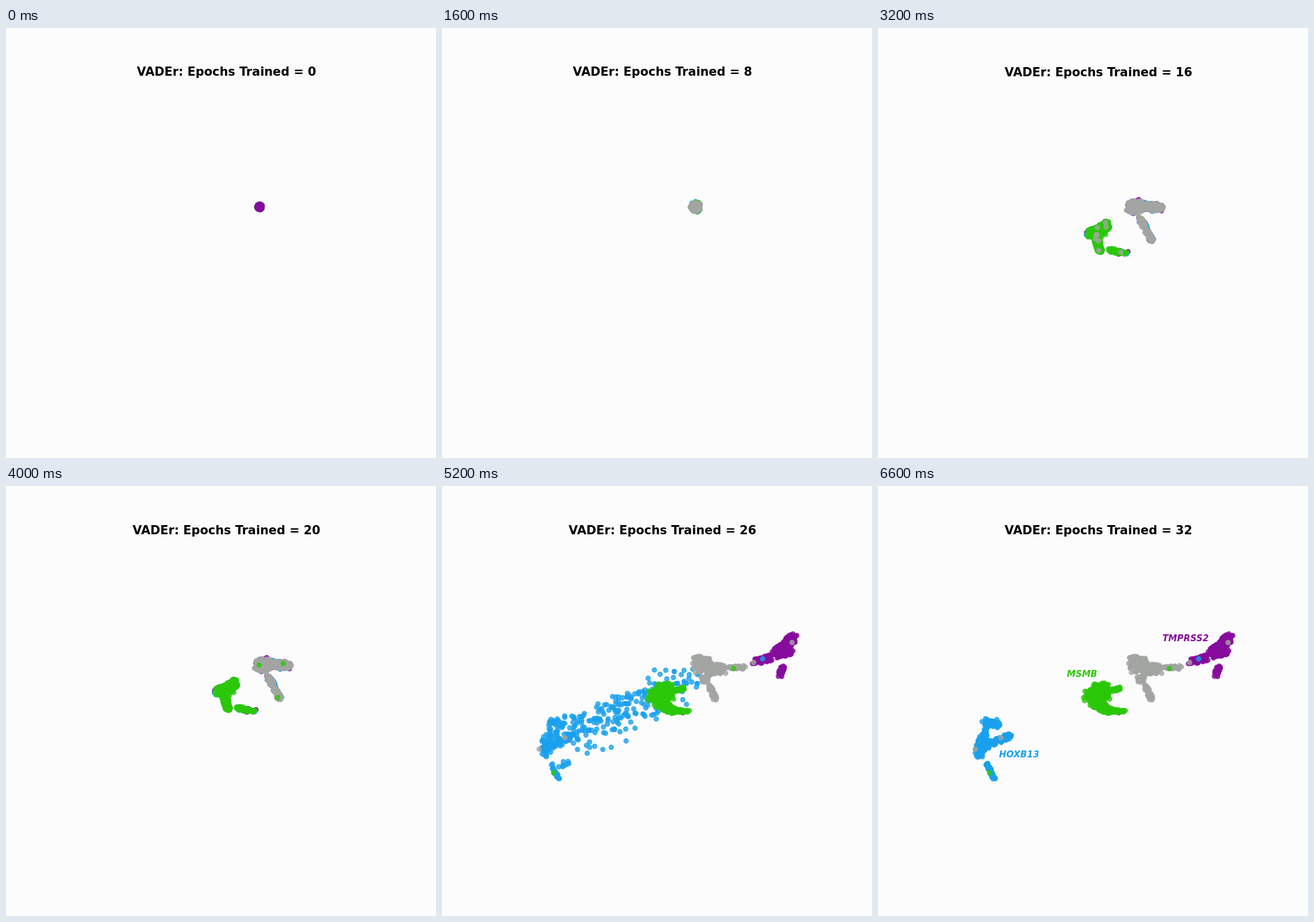
Recreate the animation shown at these times as an HTML page with a canvas. Size 748 px wide and 748 px high, loop 8 s.

```html
<!DOCTYPE html>
<html lang="en">
<head>
<meta charset="utf-8">
<title>Latent space training</title>
<style>
html, body { margin: 0; width: 100%; height: 100%; overflow: hidden; background: #fcfcfc; }
canvas { display: block; }
</style>
</head>
<body>
<canvas id="stage" width="748" height="748"></canvas>
<script>
const ctx = document.getElementById('stage').getContext('2d');
const LOOP = 8000, STEP = 200, LAST = 32;
const FONT = '"DejaVu Sans", sans-serif';

// Regions are brush strokes: share of dots, x1, y1, x2, y2, spread.
const leftEarly = [
  [.5, 370, 358, 390, 351, 8], [.26, 380, 367, 386, 388, 5], [.1, 386, 346, 398, 339, 4],
  [.07, 402, 386, 430, 392, 4], [.07, 390, 352, 402, 347, 3]];
const left = [
  [.5, 366, 366, 395, 360, 11], [.26, 374, 376, 400, 391, 8], [.1, 378, 348, 396, 348, 6],
  [.07, 406, 391, 428, 392, 3], [.07, 402, 357, 422, 352, 2.5]];
const midEarly = [
  [.4, 443, 312, 450, 311, 11], [.3, 462, 310, 488, 312, 6.5], [.12, 454, 331, 466, 347, 4],
  [.08, 467, 352, 476, 369, 4], [.1, 480, 312, 494, 313, 4]];
const mid = [
  [.4, 444, 304, 462, 310, 9], [.3, 446, 317, 490, 319, 9], [.12, 452, 337, 464, 333, 5],
  [.08, 465, 347, 475, 370, 4], [.1, 492, 316, 526, 316, 3]];
const right = [
  [.5, 582, 291, 611, 264, 8.5], [.2, 585, 292, 606, 288, 7],
  [.2, 543, 306, 575, 298, 5.5], [.1, 593, 315, 587, 330, 4]];
const far = [
  [.42, 183, 440, 176, 466, 8.5], [.23, 189, 452, 230, 433, 6], [.15, 184, 410, 208, 416, 6],
  [.06, 188, 420, 187, 436, 3], [.14, 189, 483, 202, 509, 3]];

function random(seed) {
  return () => {
    seed = (seed + 0x6D2B79F5) | 0;
    let t = Math.imul(seed ^ (seed >>> 15), 1 | seed);
    t = (t + Math.imul(t ^ (t >>> 7), 61 | t)) ^ t;
    return ((t ^ (t >>> 14)) >>> 0) / 4294967296;
  };
}

const mix = (a, b, f) => a + (b - a) * f;
const ease = p => (p = Math.min(1, Math.max(0, p)), p * p * (3 - 2 * p));

// A dot's place in a region; `pick` chooses the stroke, `along` the spot on it.
function spot(region, { pick, along, dx, dy, wide }) {
  let sum = 0;
  const [, x1, y1, x2, y2, r] = region.find(s => (sum += s[0]) > pick) || region[0];
  return [mix(x1, x2, along) + dx * r * wide, mix(y1, y2, along) + dy * r * wide];
}

// midShare: part that first gathers in the middle; dots leave for home from `leave` on.
function group(seed, color, home, count, midShare, leave, leaveSpan) {
  const rnd = random(seed);
  const dots = Array.from({ length: count }, () => {
    const angle = rnd() * 2 * Math.PI, dist = Math.sqrt(rnd());
    const dot = {
      dx: dist * Math.cos(angle), dy: dist * Math.sin(angle),
      pick: rnd(), along: rnd(),
      wide: rnd() < 0.04 ? 1.6 : 1,
      start: leave + leaveSpan * rnd(),
    };
    const goal = rnd() < 0.012 ? [left, mid, right, far][Math.floor(rnd() * 3.3)] : home;
    dot.early = spot(rnd() < midShare ? midEarly : leftEarly, dot);
    dot.late = spot(goal, dot);
    dot.trip = Math.hypot(dot.late[0] - dot.early[0], dot.late[1] - dot.early[1]);
    return dot;
  });
  return { color, dots };
}

const purple = group(11, '#860d9d', right, 380, 0.75, 20, 2.5);
const blue = group(22, '#1aa0ec', far, 380, 0.6, 22, 3.5);
const green = group(33, '#2cc80a', left, 450, 0.01, 20, 3);
const grey = group(44, '#a3a5a3', mid, 450, 0.98, 20, 3);

function place(dot, epoch) {
  const knot = (4.4 + 0.39 * epoch) * Math.sqrt(dot.wide);
  const split = ease((epoch - 8) / 4);
  const travel = ease((epoch - dot.start) / 3);
  const wander = 0.3 * travel * (1 - travel) * dot.trip;
  const at = (axis, centre, d) =>
    mix(mix(centre + d * knot, dot.early[axis], split), dot.late[axis], travel) + d * wander;
  return [at(0, 441, dot.dx), at(1, 311.3, dot.dy)];
}

function drawGroup({ color, dots }, epoch) {
  ctx.fillStyle = ctx.strokeStyle = color;
  ctx.lineWidth = 1.2;
  ctx.globalAlpha = 0.8;
  for (const dot of dots) {
    ctx.beginPath();
    ctx.arc(...place(dot, epoch), 4, 0, 2 * Math.PI);
    ctx.fill();
    ctx.stroke();
  }
  ctx.globalAlpha = 1;
}

function label(text, x, y, color, font) {
  ctx.font = `${font} ${FONT}`;
  ctx.fillStyle = color;
  ctx.fillText(text, x, y);
}

function layers(epoch) {
  if (epoch < 4) return [green, blue, grey, purple];
  if (epoch < 19) return [purple, blue, green, grey];
  return [purple, blue, grey, green];
}

function draw(step) {
  const epoch = Math.min(step, LAST);
  ctx.fillStyle = '#fcfcfc';
  ctx.fillRect(0, 0, 748, 748);
  layers(epoch).forEach(g => drawGroup(g, epoch));
  ctx.textAlign = 'center';
  label(`VADEr: Epochs Trained = ${epoch}`, 383.5, epoch < 10 ? 83 : 84, '#000', 'bold 20.83px');
  if (step > LAST) {
    const style = 'italic bold 15.28px';
    label('TMPRSS2', 535, 270, purple.color, style);
    label('MSMB', 355, 331.5, green.color, style);
    label('HOXB13', 245.5, 472, blue.color, style);
  }
}

const start = performance.now();
let shown = -1;
function tick() {
  const step = Math.min(LAST + 1, Math.floor((performance.now() - start) % LOOP / STEP));
  if (step !== shown) draw(shown = step);
  requestAnimationFrame(tick);
}
tick();
</script>
</body>
</html>
```
